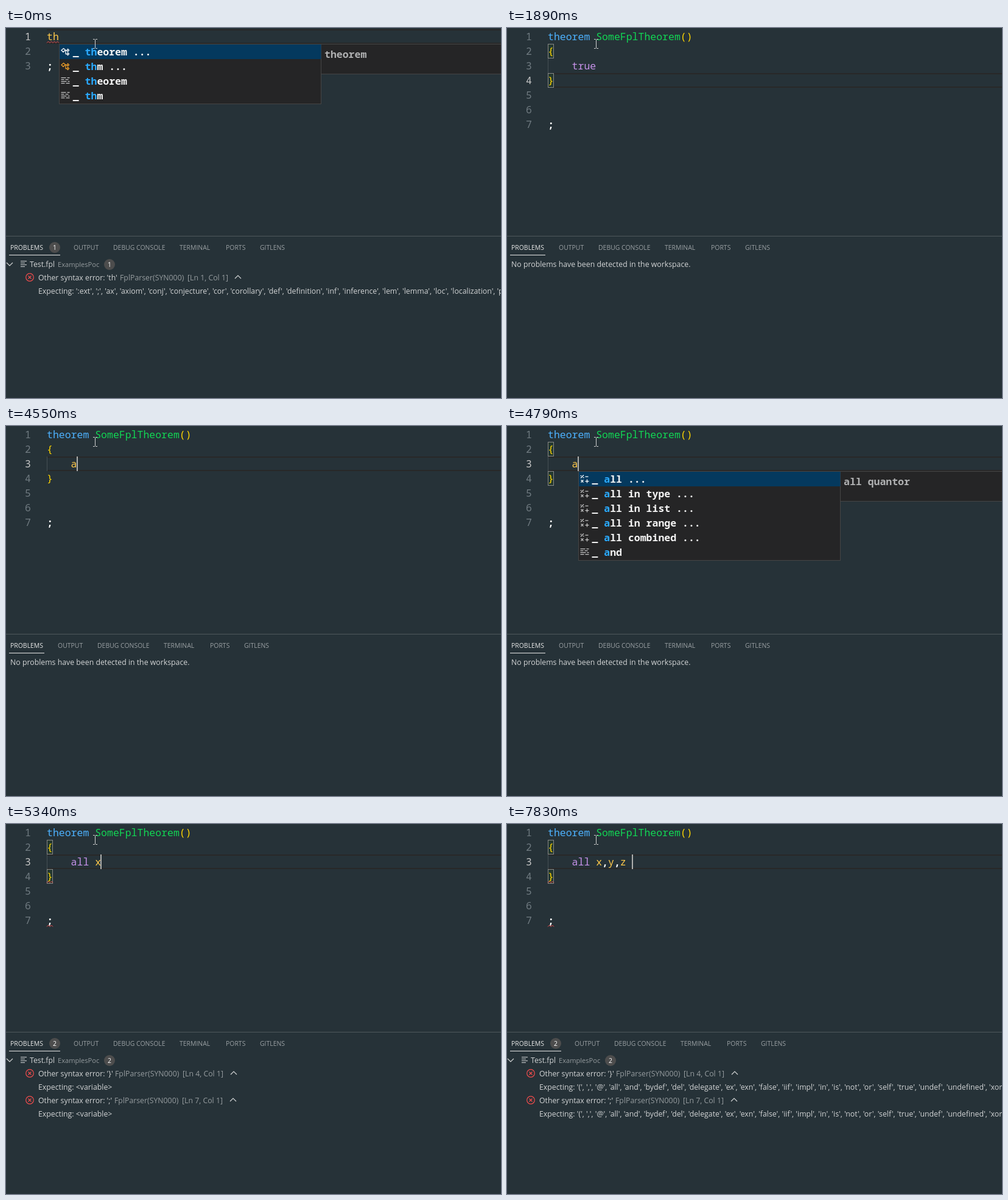
Write an HTML page that moves like this. It is 813 px wide and 607 px high and loops after 8000 ms.

```html
<!DOCTYPE html>
<html lang="en">
<head>
<meta charset="utf-8">
<title>Theorem snippet demo</title>
<style>
html, body { margin: 0; width: 100%; height: 100%; overflow: hidden; background: #263238; }
svg { display: block; width: 813px; height: 607px; }
text { white-space: pre; }
.code { font: 16.5px "Noto Sans Mono", "DejaVu Sans Mono", monospace; }
.code.bold { font-weight: 600; }
.ui { font: 12.3px "Open Sans", "Noto Sans", sans-serif; }
.tab { font: 10.45px "Open Sans", "Noto Sans", sans-serif; }
.dim { font: 11.1px "Open Sans", "Noto Sans", sans-serif; }
</style>
</head>
<body>
<svg id="stage" viewBox="0 0 813 607"></svg>
<script>
(() => {
const LOOP = 8000, LEFT = 67, CHAR = 9.9, ROW = 24;
const stage = document.getElementById('stage');
const color = {
  key: '#4db2ff', name: '#12d654', gold: '#ffd700', word: '#c792ea', id: '#ffca4b',
  white: '#ffffff', text: '#d2d4d5', grey: '#959b9e', red: '#f14c4c', match: '#2aaaff'
};

const startItems = [['tree', 'theorem ...'], ['tree', 'thm ...', '#ee9d28'], ['list', 'theorem'], ['list', 'thm']];
const allItems = ['all ...', 'all in type ...', 'all in list ...', 'all in range ...', 'all combined ...'].map(s => ['op', s]);
const startPop = { row: 1, col: 2, match: 'th', items: startItems, doc: 'theorem' };
const allPop = (col, match, extra = []) =>
  ({ row: 3, col, match, items: [...allItems, ...extra], doc: 'all quantor' });

const quote = words => words.split(' ').map(w => `'${w}'`).join(', ');
const startList = quote(':ext ; ax axiom conj conjecture cor corollary def definition inf inference lem lemma loc localization post');
const exprList = quote('( , @ all and bydef del delegate ex exn false iif impl in is not or self true undef undefined xor');
const variable = '<variable>';
const startError = [{ what: 'th', pos: 'Ln 1, Col 1', at: [187, 298, 381], expect: startList }];
const bodyErrors = expect => [
  { what: '}', pos: 'Ln 4, Col 1', at: [179, 290, 374], expect },
  { what: ';', pos: 'Ln 7, Col 1', at: [178, 289, 373], expect }
];

// Each step changes only the listed parts of the state.
const steps = [
  [0, { body: false, row: 1, col: 2, caret: false, pair: false, wavy: [[1, 20]], pop: startPop, errors: startError }],
  [280, { body: true, line: 'true', row: 5, col: 0, caret: true, pop: null }],
  [430, { wavy: [] }],
  [550, { errors: [] }],
  [810, { caret: false }],
  [1330, { row: 4, caret: true }],
  [1480, { pair: true }],
  [1890, { caret: false }],
  [2160, { row: 5, caret: true, pair: false }],
  [2440, { row: 4, pair: true }],
  [2590, { row: 3 }],
  [2710, { pair: false }],
  [3140, { caret: false }],
  [3560, { col: 4, caret: true }],
  [3700, { col: 8 }],
  [3980, { line: 'tru', col: 7 }],
  [4130, { line: 'tr', col: 6 }],
  [4270, { line: 't', col: 5 }],
  [4400, { line: '', col: 4 }],
  [4550, { line: 'a', col: 5 }],
  [4670, { pair: true, pop: allPop(5, 'a', [['list', 'and']]) }],
  [4820, { line: 'al', col: 6, pop: allPop(5, 'al') }],
  [4940, { line: 'all', col: 7, pop: allPop(5, 'all') }],
  [5190, { line: 'all ', col: 8, pop: allPop(8, 'all'), wavy: [[4, 10], [7, 10]], errors: bodyErrors(variable) }],
  [5340, { line: 'all x', col: 9, pop: null }],
  [5610, { line: 'all x,', col: 10 }],
  [5750, { line: 'all x,y', col: 11 }],
  [5980, { errors: bodyErrors(exprList) }],
  [6380, { line: 'all x,y,', col: 12, errors: bodyErrors(variable) }],
  [7030, { caret: false }],
  [7460, { line: 'all x,y,z', col: 13, caret: true }],
  [7600, { errors: bodyErrors(exprList) }],
  [7830, { line: 'all x,y,z ', col: 14 }]
];
const states = [];
steps.forEach(([, change], i) => states.push({ ...states[i - 1], ...change }));

function add(tag, attrs, parent = stage) {
  const el = document.createElementNS('http://www.w3.org/2000/svg', tag);
  for (const k in attrs) el.setAttribute(k, attrs[k]);
  return parent.appendChild(el);
}
const rect = (x, y, width, height, fill, more) => add('rect', { x, y, width, height, fill, ...more });
const line = (d, stroke, more) => add('path', { d, stroke, fill: 'none', ...more });
function label(x, y, str, cls, fill, more) {
  const el = add('text', { x, y, class: cls, fill, ...more });
  el.textContent = str;
  return el;
}
const colX = col => LEFT + col * CHAR;
const rowY = row => 2 + (row - 1) * ROW;
const code = (row, col, str, fill, bold) =>
  label(colX(col), rowY(row) + 18, str, bold ? 'code bold' : 'code', fill);

function drawExpression(str) {
  for (const m of str.matchAll(/\w+|,/g)) {
    const comma = m[0] === ',';
    const fill = comma ? color.white : /^(true|all)$/.test(m[0]) ? color.word : color.id;
    code(3, 4 + m.index, m[0], fill, comma);
  }
}

function drawEditor(s) {
  const last = s.body ? 7 : 3;
  const y = rowY(s.row);
  rect(LEFT, y, 746, 2, '#282828');
  rect(LEFT, y + ROW - 2, 746, 2, '#282828');
  for (let n = 1; n <= last; n++) {
    label(31, rowY(n) + 18, n, 'code', n === s.row ? '#c6c6c6' : '#6f7a80');
  }
  if (s.body) {
    rect(LEFT, rowY(3), 1, ROW, '#465055');
    if (s.pair) [2, 4].forEach(n => rect(67.5, rowY(n) + .5, 9, 23, '#24382f', { stroke: '#888888' }));
    code(1, 0, 'theorem', color.key);
    code(1, 8, 'SomeFplTheorem', color.name);
    code(1, 22, '()', color.gold);
    code(2, 0, '{', color.gold);
    drawExpression(s.line);
    code(4, 0, '}', color.gold);
  } else {
    code(1, 0, 'th', color.id);
  }
  code(last, 0, ';', color.white, true);
  for (const [row, w] of s.wavy) {
    let d = `M${LEFT} ${rowY(row) + 22.5}`;
    for (let x = 0; x < w; x += 5) d += 'l2.5-2.5l2.5 2.5';
    line(d, color.red);
  }
  if (s.caret) rect(Math.floor(LEFT + s.col * 9.87), y, 2, ROW, '#aeafad');
}

const icons = {
  tree: 'M5 2.5L8 5 4.5 8.5 1.5 5.5ZM7 5.5H11M8.5 5.5V11.5H11M12 3.5L14 5.5 12 7.5 10.5 6ZM12 9.5L14 11.5 12 13.5 10.5 12Z',
  list: 'M1 2.5H9M11 2.5H15M1 5.5H6M8 5.5H13M1 8.5H10M12 8.5H15M1 11.5H7M9 11.5H15',
  op: 'M1.5 6.5L6.5 1.5M1 2.5H3M5 5.5H7M9 4H14M2 9.5L6 13.5M6 9.5L2 13.5M9 11.5H15M12 8.5V14.5'
};

function drawPopup(p) {
  const x = Math.floor(colX(p.col)) + 1.5, y = rowY(p.row) + 24.5;
  const edge = { stroke: '#454545' };
  rect(x, y, 430, p.items.length * ROW + 2, '#252526', edge);
  rect(x + 430, y, 420, 49, '#252526', edge);
  rect(x + .5, y + .5, 429.5, ROW, '#04395e');
  p.items.forEach(([icon, str, tint], i) => {
    const itemY = y + .5 + i * ROW;
    line(icons[icon], tint || (i ? '#c5c5c5' : '#ffffff'),
      { transform: `translate(${x + 2} ${itemY + 4})`, 'stroke-width': 1.25 });
    const el = label(colX(p.col) + 23, itemY + 18, '_ ', 'code bold', '#f4f4f4');
    add('tspan', { fill: color.match, 'font-weight': 700 }, el).textContent = str.slice(0, p.match.length);
    add('tspan', {}, el).textContent = str.slice(p.match.length);
  });
  label(x + 435.5, y + 22, p.doc, 'code bold', '#b0b1b2');
}

function badge(x, y, n) {
  add('circle', { cx: x, cy: y, r: 9, fill: '#4d4d4d' });
  label(x, y + 4, n, 'tab', '#ffffff', { 'text-anchor': 'middle' });
}

function drawError(e, y) {
  add('circle', { cx: 39, cy: y, r: 6.3, fill: 'none', stroke: color.red, 'stroke-width': 1.2 });
  line(`M36.5 ${y - 2.5}l5 5m0-5l-5 5`, color.red, { 'stroke-width': 1.2 });
  const [source, pos, chevron] = e.at;
  label(53, y + 5, `Other syntax error: '${e.what}'`, 'ui', color.text);
  label(source, y + 5, 'FplParser(SYN000)', 'ui', color.grey);
  label(pos, y + 5, `[${e.pos}]`, 'ui', color.grey);
  line(`M${chevron - 5} ${y + 2}l5-5 5 5`, color.text, { 'stroke-width': 1.2 });
  label(53, y + 27, `Expecting: ${e.expect}`, 'ui', color.text);
}

function drawPanel(errors) {
  const count = errors.length, shift = count ? 26 : 0;
  rect(0, 341, 813, 1, '#4f585c');
  label(7, 364, 'PROBLEMS', 'tab', '#e7e7e7');
  rect(5, 372, 58 + shift, 1, '#e7e7e7');
  [['OUTPUT', 85], ['DEBUG CONSOLE', 150], ['TERMINAL', 259], ['PORTS', 335], ['GITLENS', 391]]
    .forEach(([name, x]) => label(x + shift, 364, name, 'tab', '#9aa0a3'));
  if (!count) {
    label(7, 392, 'No problems have been detected in the workspace.', 'ui', color.text);
    return;
  }
  badge(80, 360, count);
  line('M1 385l5 5 5-5', color.text, { 'stroke-width': 1.2 });
  line('M24 382.5h10M24 385.5h7M24 388.5h10M24 391.5h7', color.text);
  label(39, 392, 'Test.fpl', 'ui', color.text);
  label(85, 392, 'ExamplesPoc', 'dim', color.grey);
  badge(170, 388, count);
  errors.forEach((e, i) => drawError(e, 409 + i * 44));
}

function draw(s) {
  stage.replaceChildren();
  drawEditor(s);
  drawPanel(s.errors);
  if (s.pop) drawPopup(s.pop);
  // mouse pointer
  line('M143 18.5h2.5l1 1 1-1h2.5M146.5 19.5v13M143 33.5h2.5l1-1 1 1h2.5', '#d4d4d4');
}

let shown = -1;
function tick() {
  const t = performance.now() % LOOP;
  const i = steps.findLastIndex(([at]) => at <= t);
  if (i !== shown) draw(states[shown = i]);
  requestAnimationFrame(tick);
}
tick();
})();
</script>
</body>
</html>
```
